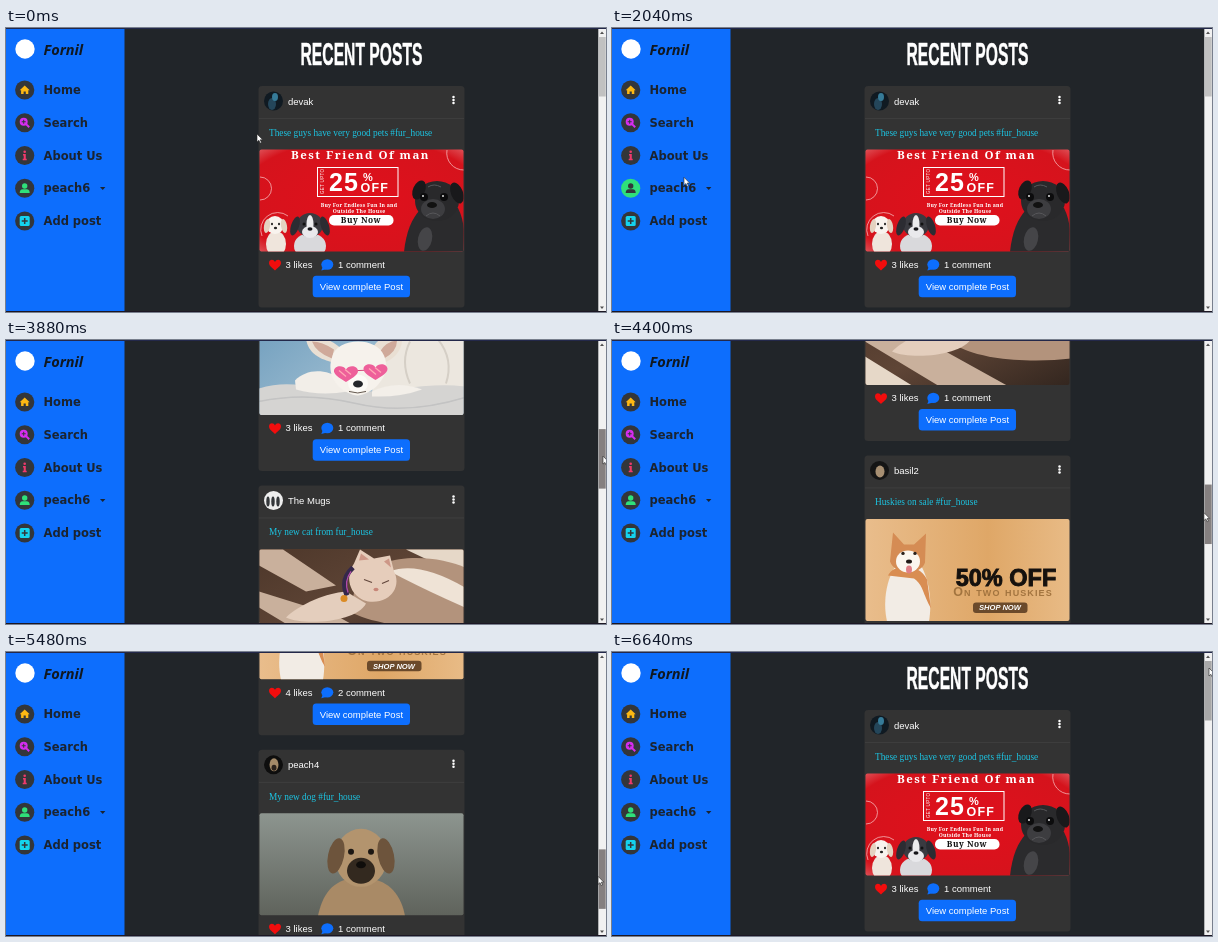
These frames come from a looping animation (600 px wide and 284 px high, 6680 ms). An HTML page:

```html
<!DOCTYPE html>
<html lang="en">
<head>
<meta charset="utf-8">
<title>Recent posts</title>
<style>
html, body { margin: 0; width: 100%; height: 100%; overflow: hidden; background: #212529; }
svg { display: block; width: 600px; height: 284px; }
text { font: 9.5px "Liberation Sans", Arial, sans-serif; fill: #fff; }
.menu { font: bold 11.5px "DejaVu Sans", Verdana, sans-serif; fill: #1b2430; }
.brand { font: italic bold 14.5px "Open Sans", "Noto Sans", sans-serif; fill: #101820; }
.note { font: 9.3px "Liberation Serif", Times, serif; fill: #1cc4e2; }
.title { font-weight: bold; font-size: 32px; stroke: #fff; stroke-width: .6px; }
.slab { font-family: "Noto Serif", serif; font-weight: 900; }
.bold { font-weight: bold; }
.mid { text-anchor: middle; }
</style>
</head>
<body>
<svg viewBox="0 0 600 284">
  <defs>
    <clipPath id="photo"><rect x="253.5" y="63.5" width="204" height="102" rx="2"/></clipPath>
    <linearGradient id="sky" x2="1" y2=".6"><stop stop-color="#6f9dbd"/><stop offset="1" stop-color="#b3ccda"/></linearGradient>
    <linearGradient id="tan"><stop stop-color="#e9bd8c"/><stop offset=".6" stop-color="#dfa767"/><stop offset="1" stop-color="#e8bb86"/></linearGradient>
    <linearGradient id="wood" x2="1" y2="1"><stop stop-color="#4d372a"/><stop offset=".5" stop-color="#5f4536"/><stop offset="1" stop-color="#33261f"/></linearGradient>
    <linearGradient id="dusk" x2="0" y2="1"><stop stop-color="#8d958f"/><stop offset="1" stop-color="#5f635c"/></linearGradient>
    <radialGradient id="red" r=".75"><stop stop-color="#e0101c"/><stop offset=".8" stop-color="#d5131c"/><stop offset="1" stop-color="#e26b70"/></radialGradient>
    <filter id="soft"><feGaussianBlur stdDeviation=".7"/></filter>
  </defs>
  <rect width="600" height="284" fill="#212529"/>
  <g id="page"></g>
  <rect width="118.5" height="284" fill="#0d6efd"/>
  <circle cx="19" cy="21" r="9.7" fill="#fff"/>
  <text class="brand" x="37.5" y="26.5">Fornil</text>
  <g id="menu"></g>
  <path d="M94 159h5.4l-2.7 3z" fill="#1b2430"/>
  <rect x="592.3" width="8" height="284" fill="#f1f1f1"/>
  <path d="M594 6l2-2.4 2 2.4zM594 278.500l2 2.400 2-2.400z" fill="#505050"/>
  <rect id="thumb" x="592.7" width="7" height="59.5"/>
  <path d="M0 .5H600" stroke="#23284a"/>
  <path d="M0 283.500H600" stroke="#1c1724"/>
  <g id="status">
    <path d="M0 284V274H115.500q2 0 2 2V284z" fill="#202124" stroke="#3c4043" stroke-width=".5"/>
    <text x="2" y="281.200" style="font-size:5.7px;fill:#e3e5e8">https://dreamy-cranachan-ac99e5.netlify.app</text>
  </g>
  <path id="cursor" d="M0 0V8L1.900 6.300L3.200 9.200L4.500 8.600L3.200 5.800H5.700Z" fill="#fff" stroke="#222" stroke-width=".6"/>
</svg>
<script>
const $ = id => document.getElementById(id);
const LOOP = 6680, DARK = '#33363a', PITCH = 236;

const oval = (x, y, rx, ry, fill, turn = 0) =>
  `<ellipse cx="${x}" cy="${y}" rx="${rx}" ry="${ry}" fill="${fill}" transform="rotate(${turn} ${x} ${y})"/>`;
const shape = (d, fill) => `<path d="${d}" fill="${fill}"/>`;
const line = (d, stroke, width) => `<path d="${d}" fill="none" stroke="${stroke}" stroke-width="${width}"/>`;
const label = (x, y, text, cls = '', style = '') =>
  `<text x="${x}" y="${y}" class="${cls}" style="${style}">${text}</text>`;
const backdrop = fill => `<rect x="253" y="63" width="205" height="103" fill="${fill}"/>`;
const heart = (x, y, fill, sx = 1, sy = sx) =>
  `<path transform="translate(${x} ${y}) scale(${sx} ${sy})" fill="${fill}" d="M0 5.400C-2 3.500-6 1-6-2C-6-5.600-1.500-6.500 0-3C1.500-6.500 6-5.600 6-2C6 1 2 3.500 0 5.400Z"/>`;
const soft = parts => `<g filter="url(#soft)">${parts}</g>`;

// Photos are drawn in card coordinates: the picture area starts at y = 63.5.
function saleBanner() {
  const whitePup = oval(270, 158, 10, 13, '#efe5dc') + oval(269, 139, 9, 9, '#f8f3ee') +
    oval(261, 140, 3, 7, '#e4d2c0', 10) + oval(278, 140, 3, 7, '#e4d2c0', -10) +
    oval(266, 138, 1, 1.200, '#222') + oval(273, 138, 1, 1.200, '#222') + oval(269.500, 142, 1.600, 1.200, '#222');
  const greyPup = oval(304, 160, 16, 13, '#d9d9dc') + oval(304, 139, 13, 12, '#3a3a40') +
    oval(289, 140, 4, 10, '#2c2c32', 18) + oval(319, 140, 4, 10, '#2c2c32', -18) +
    oval(304, 138, 3.500, 9, '#ececee') + oval(304, 146, 8, 6, '#e9e9ec') +
    oval(298, 138, 1.500, 1.600, '#111') + oval(310, 138, 1.500, 1.600, '#111') + oval(304, 143, 2.500, 1.800, '#16161a');
  const pug = shape('M398 166C400 146 406 132 414 124L452 122C459 136 459 152 459 166Z', '#2b2b2d') +
    oval(431, 115, 22, 20, '#29292b') + oval(413, 104, 6, 10, '#19191b', 24) + oval(451, 107, 6, 11, '#19191b', -22) +
    oval(427, 123, 12, 10, '#3d3d40') + oval(426, 119, 5, 3, '#111') + oval(418, 111, 4, 4, '#0c0c0d') +
    oval(438, 111, 4, 4, '#0c0c0d') + oval(417, 110, 1, 1, '#ddd') + oval(437, 110, 1, 1, '#ddd') +
    line('M422 101q6-4 13 0M420 130q7-6 14 0', '#57575a', 1) + oval(419, 153, 7, 12, '#454548', 12);
  return backdrop('url(#red)') +
    line('M254 91a11 11 0 0 1 0 23M256 150a17 17 0 0 1 26-20M441 64a17 17 0 0 0 17 20', '#f5b3b5', .8) +
    label(354.500, 73, 'Best Friend Of man', 'slab mid', 'font-size:11.5px;letter-spacing:1.5px') +
    '<rect x="311.500" y="81.500" width="80.500" height="29" fill="none" stroke="#fff"/>' +
    `<g transform="rotate(-90 318 108)">${label(318, 108, 'GET UPTO', '', 'font-size:4.5px;letter-spacing:.3px')}</g>` +
    label(323, 104.500, '25', 'bold', 'font-size:25px;letter-spacing:1px') +
    label(357, 95, '%', 'bold', 'font-size:11px') +
    label(354.500, 105.500, 'OFF', 'bold', 'font-size:12.5px;letter-spacing:1.2px') +
    label(353, 121, 'Buy For Endless Fun In and', 'slab mid', 'font-size:5.2px;letter-spacing:.2px') +
    label(353, 127, 'Outside The House', 'slab mid', 'font-size:5.2px;letter-spacing:.2px') +
    '<rect x="323" y="129" width="64.500" height="10.500" rx="5" fill="#fff"/>' +
    label(355, 137.200, 'Buy Now', 'slab mid', 'font-size:8.3px;letter-spacing:.5px;fill:#111') +
    soft(whitePup + greyPup + pug);
}

function whiteDog() {
  return backdrop('url(#sky)') + soft(
    shape('M366 146C368 108 384 82 408 79C430 76 446 80 459 84V148Z', '#ece7df') +
    line('M404 92q-10 20 0 42M432 90q16 20 8 44', '#d5cfc6', 2) +
    shape('M253 139C285 129 310 140 345 142S420 132 459 137V167H253Z', '#d5d4d2') +
    line('M253 152Q300 142 350 154T459 148', '#c3c3c3', 1.500) +
    shape('M289 131C300 120 318 118 336 130L342 142Q314 147 290 140Z', '#f2eee8') +
    shape('M366 142Q390 130 416 140Q394 148 366 147Z', '#f3efe9') +
    shape('M334 98C322 88 310 86 300 89C302 104 314 110 328 113Z', '#e9dfd3') +
    shape('M368 96C374 87 386 84 396 88C397 102 386 111 376 114Z', '#e9dfd3') +
    shape('M328 100Q316 92 306 92Q310 103 326 109ZM374 102Q380 92 391 91Q391 102 378 109Z', '#cfa99a') +
    shape('M326 108C330 88 370 86 378 106C386 124 370 144 352 146C336 145 319 128 326 108Z', '#f6f2ec') +
    oval(352, 134, 10, 9, '#fcfaf6') + oval(352, 134.500, 5, 3.500, '#24262a') + line('M343 142q9 3 17 0', '#64594f', 1)) +
    line('M328 122L380 120', '#d44b7c', 1) +
    heart(340, 124.500, '#ee5f9a', 2, 1.500) + heart(369.500, 122.500, '#ee5f9a', 2, 1.500) +
    line('M333 121l7 6M339 120l6 5M363 119l7 6M369 118l6 5', '#ffa9b4', 1.200);
}

function sunnyCat() {
  return backdrop('url(#wood)') + soft(
    shape('M253 64H277L330 100L300 106L253 80ZM253 106L330 130L395 166H326L253 122Z', '#c9b09c') +
    shape('M253 137L300 166H253ZM400 64H459V92Z', '#e6d8c8') +
    shape('M350 98C374 64 432 70 459 82V139C425 143 372 142 344 126Z', '#b3937c') +
    shape('M384 86Q412 75 459 102V122Q418 104 384 86Z', '#efe3d6') +
    shape('M348 78L354 64L368 73L384 70L388 86C396 101 384 119 362 116C344 112 338 92 348 78Z', '#e6cdbb') +
    shape('M353 75L355 68L363 74ZM378 76L383 73L385 82Z', '#cd9787') +
    line('M358 94l8 3M376 98l7-3', '#62473c', 1.200) + oval(370, 104, 2.500, 1.800, '#c78678') +
    shape('M340 106C315 108 290 122 280 132C300 141 351 136 360 118Z', '#e4cebd')) +
    line('M347 82Q334 94 341 110', '#35284b', 5) +
    line('M345 86Q338 96 342 107', '#b34aaa', 1.300) + oval(338, 113, 3.500, 3.500, '#db8b24');
}

function huskyBanner() {
  return backdrop('url(#tan)') + soft(
    shape('M275 166C270 143 276 121 284 110H309C318 126 320 148 317 166Z', '#f2ece5') +
    shape('M276 120C282 108 306 106 315 124L319 153C311 140 312 130 302 123Z', '#d98d52') +
    shape('M278 106L281 77L292 89H302L314 78L313 107C309 120 283 120 278 106Z', '#d58c54') +
    oval(296, 106, 12, 11, '#fbf6ef') + oval(291, 98, 1.700, 1.700, '#2a211c') + oval(303, 98, 1.700, 1.700, '#2a211c') +
    oval(297, 106, 3, 2, '#211a17') + oval(297, 114, 3, 4, '#e07f86')) +
    label(394, 130.500, '50% OFF', 'bold mid', 'font-size:23.5px;fill:#15110e;stroke:#15110e;stroke-width:.9px') +
    label(391, 141, 'On two huskies', 'bold mid', 'font-size:12.5px;font-variant:small-caps;letter-spacing:1.1px;fill:#a2743f') +
    '<rect x="361" y="147" width="54.500" height="10.500" rx="3" fill="#6b4a2b"/>' +
    label(388, 155, 'SHOP NOW', 'bold mid', 'font-size:7.6px;font-style:italic');
}

function tanDog() {
  return backdrop('url(#dusk)') + soft(
    shape('M312 166C318 138 332 128 355 128S394 140 399 166Z', '#a98a66') +
    oval(355, 108, 26, 29, '#b3946e') + oval(330, 106, 8, 18, '#6d543c', 12) + oval(380, 106, 8, 18, '#6d543c', -12) +
    oval(355, 121, 14, 13, '#33291f') + oval(345, 102, 3, 3, '#1c1713') + oval(365, 102, 3, 3, '#1c1713') +
    oval(355, 115, 5, 3.500, '#0f0d0b'));
}

const face = (fill, parts) => `<circle cx="267.500" cy="15" r="9.500" fill="${fill}"/>` + parts;

const posts = [
  ['devak', face('#101a22', oval(266, 18, 4, 6, '#24465a') + oval(269, 11, 3, 4, '#367b98')),
    'These guys have very good pets #fur_house', saleBanner, 3, 1],
  ['peach9', face('#f0eeeb', oval(267, 13, 3.500, 3, '#9a8d83') + oval(268, 19, 3, 5, '#c9beb4')),
    'My New esky #fur_house', whiteDog, 3, 1],
  ['The Mugs', face('#eee', [262, 267, 272].map(x => oval(x, 16, 1.700, 5, '#34373a')).join('')),
    'My new cat from fur_house', sunnyCat, 3, 1],
  ['basil2', face('#151515', oval(268, 16, 4.500, 6, '#a78f72')),
    'Huskies on sale #fur_house', huskyBanner, 4, 2],
  ['peach4', face('#0e0e0e', oval(268, 15, 4.500, 6.500, '#a48a68') + oval(268, 18, 2.500, 3, '#2b221c')),
    'My new dog #fur_house', tanDog, 3, 1]
];

const card = ([name, avatar, note, photo, likes, comments], i) => `<g transform="translate(0 ${58 + i * PITCH})">
  <rect x="252.500" width="206" height="221.500" rx="3.500" fill="#333"/>
  ${avatar}${label(282, 18.600, name)}
  ${[11, 14, 17].map(y => oval(447.500, y, 1.250, 1.250, '#fff')).join('')}
  ${line('M253 32.500H458', '#404040', .8)}
  ${label(263, 50, note, 'note')}
  <g clip-path="url(#photo)">${photo()}</g>
  ${heart(269, 179, '#f20d0d')}${label(279.500, 181.800, likes + ' likes')}
  ${oval(321.300, 178.500, 6, 5.200, '#0d6efd')}${shape('M317 180L315.300 184.500L321 183Z', '#0d6efd')}
  ${label(332, 181.800, comments + ' comment')}
  <rect x="306.700" y="189.700" width="97.300" height="21.500" rx="3.500" fill="#0d6efd"/>
  ${label(355.400, 203.700, 'View complete Post', 'mid')}</g>`;

$('page').innerHTML =
  '<g transform="translate(355.500 37) scale(.49 1)"><text class="title mid">RECENT POSTS</text></g>' +
  posts.map(card).join('') +
  '<rect id="blank" x="118" y="1030" width="474" height="600" fill="#212529"/>';

const links = [
  ['Home', '#fdb813', shape('M-5 .3L0-4.500L5 .3H3.600V4H1.100V1.500H-1.100V4H-3.600V.3Z', 'currentColor')],
  ['Search', '#d62df0', oval(-1, -1, 4, 4, 'currentColor') + line('M1.400 1.400L4.500 4.500', 'currentColor', 2) +
    line('M-3-1H1M-1-3V1', 'var(--disc)', 1)],
  ['About Us', '#ee3a6c', shape('M-1.700-1.500H1.100V3.200H2V4.700H-2V3.200H-1V0H-1.700Z', 'currentColor') + oval(0, -3.700, 1.300, 1.300, 'currentColor')],
  ['peach6', '#2fe07a', oval(0, -2.300, 2.700, 2.700, 'currentColor') + shape('M-5 4.800Q-5 1 -2 1H2Q5 1 5 4.800Z', 'currentColor')],
  ['Add post', '#14d3ee', '<rect x="-5" y="-5" width="10" height="10" rx="1.500" fill="currentColor"/>' +
    line('M-3 0H3M0-3V3', 'var(--disc)', 1.500)]
];
$('menu').innerHTML = links.map(([name, , icon], i) =>
  `<g transform="translate(18.700 ${62 + i * 32.75})">${oval(0, 0, 9.600, 9.600, 'var(--disc)')}${icon}${label(18.800, 4.200, name, 'menu')}</g>`).join('');

// Tracks: [time, value...]; monotone cubic between the points.
const pointer = [
  [0, 251, 106], [620, 80, 60], [920, 72, 77], [1340, 72, 94], [1760, 72, 127], [2180, 72, 160], [2600, 73, 190],
  [2720, 74, 193], [2780, 74, 193], [3080, 598, 37], [3140, 598, 37], [3200, 598, 38], [3880, 597, 116],
  [4880, 588, 221], [5240, 590, 252], [6040, 597, 82], [6360, 598, 30], [6640, 597, 16], [LOOP, 597, 16]
];
const scroll = [[0, 0], [3140, 0], [3200, 6.5], [3880, 384], [4880, 879], [5240, 1030], [6040, 249.5], [6360, 0], [LOOP, 0]];
const PAINTED = 4940; // the last card stays blank until then

function at(track, t, k = 1) {
  let i = 0;
  while (i < track.length - 2 && t >= track[i + 1][0]) i++;
  const slope = j => track[j] && track[j + 1] ? (track[j + 1][k] - track[j][k]) / (track[j + 1][0] - track[j][0]) : 0;
  const tangent = j => {
    const a = slope(j - 1), b = slope(j);
    return a * b > 0 ? 2 * a * b / (a + b) : 0;
  };
  const [p, q] = [track[i], track[i + 1]], h = q[0] - p[0], u = (t - p[0]) / h, v = 1 - u;
  return p[k] * v * v * (1 + 2 * u) + q[k] * u * u * (3 - 2 * u) + h * u * v * (tangent(i) * v - tangent(i + 1) * u);
}

const start = performance.now();
function draw(now) {
  const t = Math.max(0, now - start) % LOOP;
  const top = at(scroll, t), x = at(pointer, t, 1), y = at(pointer, t, 2);
  $('page').setAttribute('transform', `translate(0 ${-top})`);
  $('blank').style.display = t < PAINTED ? '' : 'none';
  $('thumb').setAttribute('y', 9 + top / 4.8);
  $('thumb').setAttribute('fill', t < 3080 ? '#c1c1c1' : t < 6500 ? '#858080' : '#a8a8a8');
  $('cursor').setAttribute('transform', `translate(${x} ${y})`);
  const over = x < 118 ? Math.round((y - 62) / 32.75) : -1;
  [...$('menu').children].forEach((item, i) => {
    const tint = links[i][1];
    item.style.color = i === over ? DARK : tint;
    item.style.setProperty('--disc', i === over ? tint : DARK);
  });
  $('status').style.display = over >= 0 && over !== 3 ? '' : 'none';
  requestAnimationFrame(draw);
}
draw(start);
</script>
</body>
</html>
```
